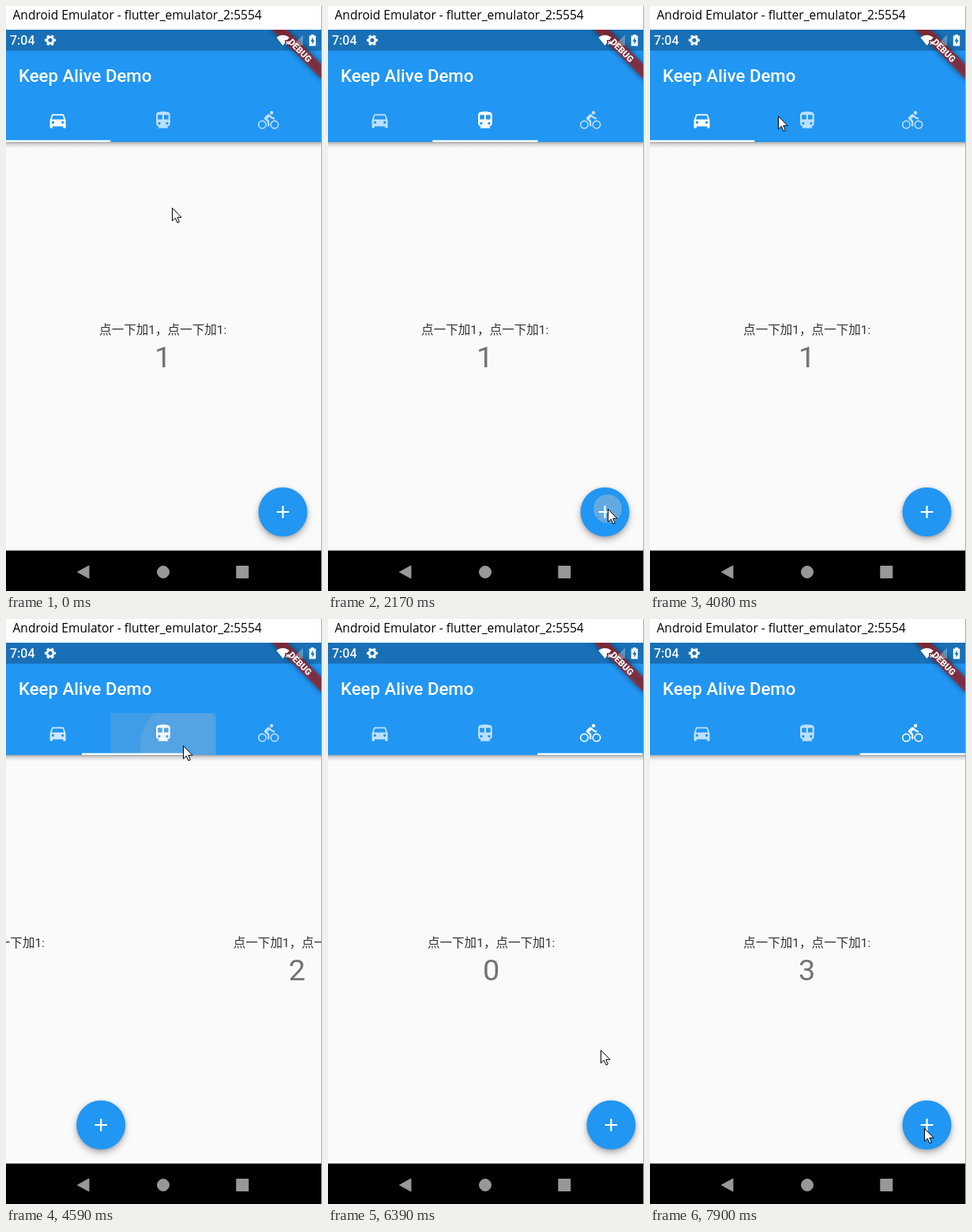
Animation of 400x740 px, one loop 8 s. Source, as an HTML page:

```html
<!DOCTYPE html>
<html lang="zh-CN">
<head>
<meta charset="utf-8">
<style>
  html, body { margin: 0; height: 100%; overflow: hidden; background: #fff; }
  svg { display: block; width: 400px; height: 740px; }
  text { font-family: Roboto, "Noto Sans CJK SC", "Noto Sans CJK", sans-serif; }
  .mid { text-anchor: middle; }
  .fab { filter: drop-shadow(0 1px 2px rgba(0, 0, 0, .15)) drop-shadow(0 4px 4px rgba(0, 0, 0, .28)); }
</style>
</head>
<body>
<svg viewBox="0 0 400 740">
  <defs>
    <linearGradient id="shade" x2="0" y2="1">
      <stop offset="0" stop-opacity=".34"/>
      <stop offset=".4" stop-opacity=".12"/>
      <stop offset="1" stop-opacity="0"/>
    </linearGradient>
    <clipPath id="screen"><rect y="30" width="399" height="710"/></clipPath>
    <clipPath id="fabClip"><circle cx="350.5" cy="640" r="31"/></clipPath>
    <clipPath id="tabClip"><rect id="tabBox" y="119" width="133.3" height="53"/></clipPath>
    <filter id="blur" x="-50%" y="-200%" width="200%" height="500%"><feGaussianBlur stdDeviation="3.5"/></filter>
  </defs>

  <rect width="400" height="740" fill="#fff"/>
  <text x="8.5" y="17" style="font:15.55px 'Open Sans', 'Noto Sans', sans-serif">Android Emulator - flutter_emulator_2:5554</text>

  <g clip-path="url(#screen)">
    <rect y="172" width="400" height="517" fill="#fafafa"/>
    <g id="pages"></g>

    <rect y="172" width="400" height="8" fill="url(#shade)"/>
    <rect y="56" width="400" height="116" fill="#2196f3"/>
    <rect y="30" width="400" height="26.5" fill="#1970b6"/>
    <text x="16" y="96" font-size="22.2" font-weight="500" fill="#fff">Keep Alive Demo</text>

    <g id="tabSplash" clip-path="url(#tabClip)">
      <rect y="119" width="400" height="53" fill="#bcbcbc" opacity=".4"/>
      <circle id="tabDrop" fill="#c8c8c8" opacity=".4"/>
    </g>
    <g id="icons" fill="#fff" fill-rule="evenodd">
      <path d="M18.92 6.01C18.72 5.42 18.16 5 17.5 5h-11c-.66 0-1.21.42-1.42 1.01L3 12v8c0 .55.45 1 1 1h1c.55 0 1-.45 1-1v-1h12v1c0 .55.45 1 1 1h1c.55 0 1-.45 1-1v-8zM5 14.5a1.5 1.5 0 0 1 3 0a1.5 1.5 0 0 1-3 0zM16 14.5a1.5 1.5 0 0 1 3 0a1.5 1.5 0 0 1-3 0zM5 11l1.5-4.5h11L19 11z"/>
      <path d="M12 2c-4.42 0-8 .5-8 4v9.5C4 17.43 5.57 19 7.5 19L6 20.5v.5h12v-.5L16.5 19c1.93 0 3.5-1.57 3.5-3.5V6c0-3.5-3.58-4-8-4zM6 15.5a1.5 1.5 0 0 1 3 0a1.5 1.5 0 0 1-3 0zM15 15.5a1.5 1.5 0 0 1 3 0a1.5 1.5 0 0 1-3 0zM6 6h5v5H6zM13 6h5v5h-5z"/>
      <g>
        <circle cx="15.5" cy="3.5" r="2"/>
        <g fill="none" stroke="#fff" stroke-width="1.5"><circle cx="5" cy="17" r="4.25"/><circle cx="19" cy="17" r="4.25"/></g>
        <path d="M10.8 10.5l2.4-2.4.8.8c1.3 1.3 3 2.1 5.1 2.1V9c-1.5 0-2.7-.6-3.6-1.5l-1.9-1.9c-.5-.4-1-.6-1.6-.6s-1.1.2-1.4.6L7.8 8.4c-.4.4-.6.9-.6 1.4 0 .6.2 1.1.6 1.4L11 14v5h2v-6.2z"/>
      </g>
    </g>
    <rect id="indicator" y="169.7" width="133.3" height="2.3" fill="#fff"/>

    <g transform="translate(399 29.5) rotate(45)">
      <rect x="-46" y="31" width="92" height="13.3" opacity=".5" filter="url(#blur)"/>
      <rect x="-46" y="31" width="92" height="13.3" fill="#b71c1c" opacity=".63"/>
      <text class="mid" y="41.8" font-size="11.3" font-weight="900" fill="#fff">DEBUG</text>
    </g>

    <text x="5" y="49" font-size="16" font-weight="500" fill="#f4f8fb">7:04</text>
    <g fill="none" stroke="#f4f8fb">
      <circle cx="56" cy="43.3" r="4" stroke-width="3"/>
      <circle cx="56" cy="43.3" r="6" stroke-width="2.2" pathLength="12" stroke-dasharray="1 1" stroke-dashoffset=".5"/>
      <path d="M354.5 44.5l4 4m0-4l-4 4" stroke-width="1.3"/>
    </g>
    <path d="M350.5 50L342.3 39.8Q350.5 33.5 358.7 39.8L356 43H353V47z" fill="#fff"/>
    <path d="M376 36.5V50H362.5z" fill="#fff" opacity=".3"/>
    <path d="M386.3 36h3.4v1.6h2.5V50.6h-8.4V37.6h2.5z" fill="#fff"/>
    <path d="M388.7 39.5v3.8h2l-3.2 5.5v-4h-2z" fill="#1970b6"/>

    <rect y="688.8" width="400" height="52"/>
    <g fill="#989898" stroke="#989898" stroke-linejoin="round">
      <path d="M90.5 716l14.5-8v16z"/>
      <circle cx="199" cy="716" r="7.5"/>
      <path d="M291.8 708.5h15v15h-15z"/>
    </g>
  </g>
  <path d="M399.5 0V740" stroke="#aaa"/>
  <path id="cursor" d="M.5 .5V16.8L4.3 13.2L7 19.2L9.4 18.1L6.8 12.3H12z" fill="#fff" stroke="#000"/>
</svg>

<script>
const LOOP = 8000, PAGE = 400, TAB = 133.3, ICON = 1.11, SLIDE = 300, PAGE_LAG = 30;
const $ = id => document.getElementById(id);
const set = (el, attrs) => { for (const k in attrs) el.setAttribute(k, attrs[k]); };

// Screen refreshes: first time, last time, number of steps.
const bursts = [[150, 310, 2], [620, 1590, 8], [1740, 1890, 2], [2170, 3140, 8], [3410, 4350, 8],
  [4470, 4860, 4], [5130, 5400, 3], [6120, 7050, 8], [7170, 7440, 3], [7750, 7900, 2]];

// Pointer positions: time, x, y.
const pointer = [[0, 210, 255], [150, 204, 180], [310, 216, 131], [620, 211, 132], [900, 211, 132],
  [1590, 354, 631], [1890, 354, 636], [2448, 354, 636], [3140, 77, 142], [3680, 77, 142],
  [4080, 162, 139], [4350, 224, 160], [5000, 224, 160], [5400, 335, 149], [6120, 335, 149],
  [6386, 345, 545], [7050, 347, 644], [LOOP, 347, 644]];

const tabClicks = [
  { press: 496, from: 0, to: 1 },
  { press: 3410, from: 1, to: 0 },
  { press: 4470, from: 0, to: 1 },
  { press: 6110, from: 1, to: 2 }];
const fabClicks = [[2170, 1], [2300, 1], [7170, 2], [7300, 2], [7750, 2]];
const startCounts = [1, 0, 0];

// CSS "ease": cubic-bezier(.25, .1, .25, 1)
function ease(x) {
  if (x <= 0 || x >= 1) return x <= 0 ? 0 : 1;
  const bezier = (s, a, b) => 3 * s * (1 - s) ** 2 * a + 3 * s * s * (1 - s) * b + s ** 3;
  let lo = 0, hi = 1;
  for (let i = 0; i < 20; i++) {
    const mid = (lo + hi) / 2;
    if (bezier(mid, .25, .25) < x) lo = mid; else hi = mid;
  }
  return bezier(lo, .1, 1);
}

function refreshTime(t) {
  let shown = 0;
  for (const [first, last, steps] of bursts) {
    if (t < first) break;
    const step = (last - first) / (steps - 1);
    shown = first + step * Math.min(steps - 1, Math.floor((t - first + 12) / step));
  }
  return shown;
}

function pointerAt(t) {
  const i = Math.max(1, pointer.findIndex(key => key[0] >= t));
  const [t0, x0, y0] = pointer[i - 1], [t1, x1, y1] = pointer[i];
  const u = (t - t0) / (t1 - t0), k = u * u * (3 - 2 * u);
  return [x0 + (x1 - x0) * k, y0 + (y1 - y0) * k];
}

$('pages').innerHTML = startCounts.map((_, i) => `
  <g transform="translate(${i * PAGE})">
    <text class="mid" x="198.7" y="414.5" font-size="15.55" fill-opacity=".8">点一下加1，点一下加1:</text>
    <text class="mid count" x="198.7" y="456.5" font-size="37.8" fill-opacity=".54"></text>
    <circle class="fab" cx="350.5" cy="640" r="31" fill="#2196f3"/>
    <g clip-path="url(#fabClip)"><circle class="drop" fill="#c8c8c8"/></g>
    <path d="M342.7 640h15.6M350.5 632.2v15.6" stroke="#fff" stroke-width="2.2"/>
  </g>`).join('');
const counts = document.querySelectorAll('.count'), drops = document.querySelectorAll('.drop');
const icons = [...$('icons').children];
icons.forEach((icon, i) => set(icon, {
  transform: `translate(${65.6 + i * TAB} 144.5) scale(${ICON}) translate(-12 -12)`
}));

function draw(t) {
  const [x, y] = pointerAt(t);
  set($('cursor'), { transform: `translate(${Math.round(x)} ${Math.round(y)})` });

  // The page follows the tab indicator with a short lag.
  let tab = 0, page = 0, tabAlpha = 0;
  for (const { press, from, to } of tabClicks) {
    if (t < press) break;
    const age = t - press;
    tab = from + (to - from) * ease(age / SLIDE);
    page = from + (to - from) * ease((age - PAGE_LAG) / SLIDE);
    tabAlpha = Math.max(0, 1 - age / 260);
    set($('tabBox'), { x: to * TAB - 1 });
    set($('tabDrop'), { cx: x, cy: y, r: 15 + age * .3 });
  }
  set($('tabSplash'), { opacity: tabAlpha });
  set($('pages'), { transform: `translate(${-page * PAGE})` });
  set($('indicator'), { x: tab * TAB - 1 });
  icons.forEach((icon, i) => set(icon, { opacity: .7 + .3 * Math.max(0, 1 - Math.abs(tab - i)) }));

  startCounts.forEach((start, i) => {
    const done = fabClicks.filter(([time, target]) => target === i && time <= t);
    const age = done.length ? t - done[done.length - 1][0] : Infinity;
    counts[i].textContent = start + done.length;
    set(drops[i], { cx: x, cy: y, r: age < 135 ? 18 + age * .2 : 0, opacity: .4 });
  });
}

function frame() {
  draw(refreshTime(performance.now() % LOOP));
  requestAnimationFrame(frame);
}
frame();
</script>
</body>
</html>
```
